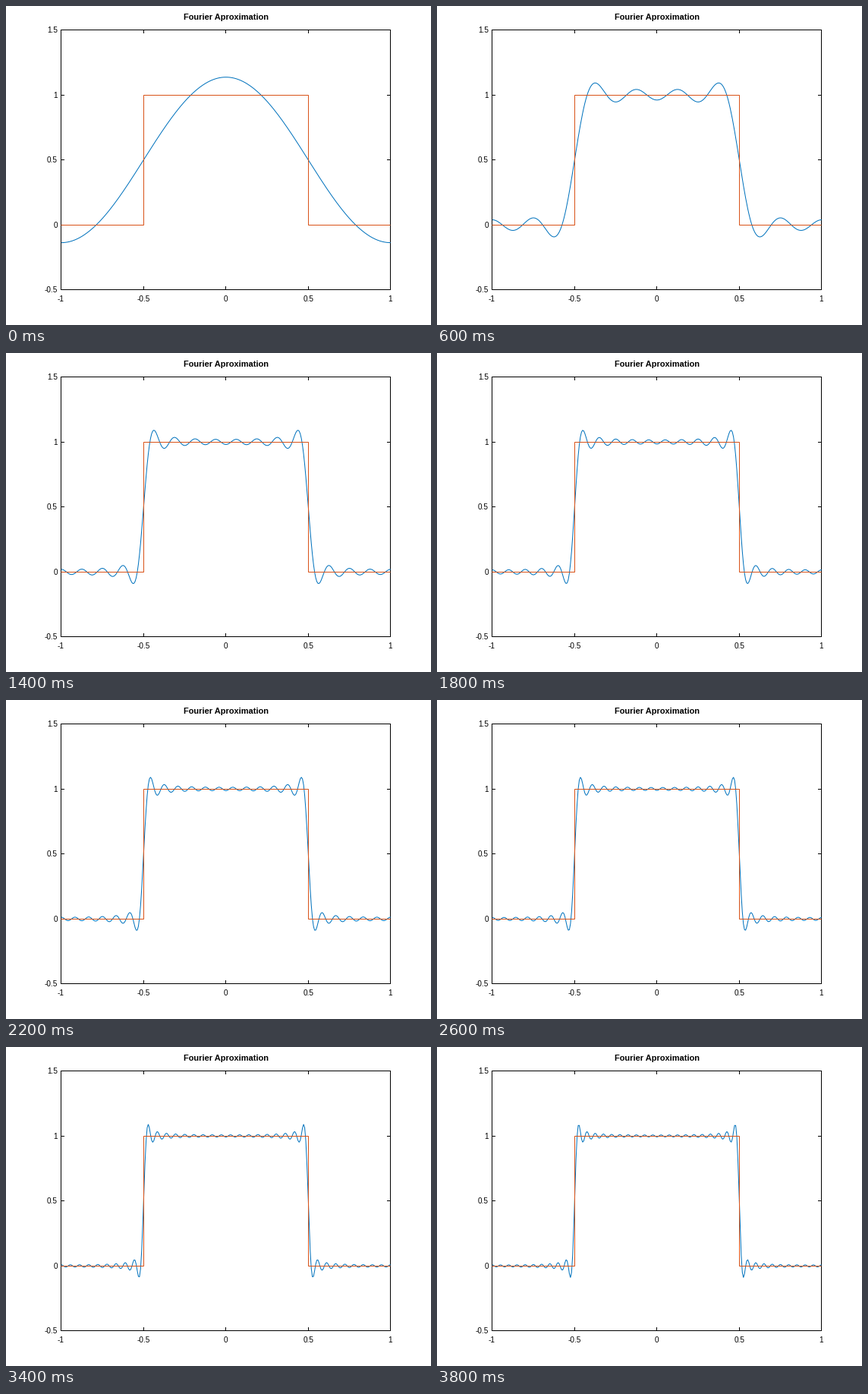
Write a matplotlib script that moves like this. It is 560 px wide and 420 px high and loops after 4000 ms.

```python
import numpy as np
import matplotlib.pyplot as plt
from matplotlib.animation import FuncAnimation
from matplotlib.collections import LineCollection

W, H, DPI = 560, 420, 80
PX = 72 / DPI  # points per pixel
LEFT, RIGHT, TOP, BOTTOM = 72.8, 506.8, 31.5, 373.8
BLUE, ORANGE = "#0072BD", "#D95319"
FRAMES, STEP_MS = 20, 200

plt.rcParams["font.family"] = "Liberation Sans"


def to_x(x):
    return LEFT + (np.asarray(x) + 1) / 2 * (RIGHT - LEFT)


def to_y(y):
    return BOTTOM - (np.asarray(y) + 0.5) / 2 * (BOTTOM - TOP)


def crisp(v):
    """Move a coordinate to the centre of its pixel."""
    return np.floor(v) + 0.5


fig = plt.figure(figsize=(W / DPI, H / DPI), dpi=DPI, facecolor="white")
ax = fig.add_axes([0, 0, 1, 1])
ax.set_xlim(0, W)
ax.set_ylim(H, 0)
ax.axis("off")


def line(xs, ys, color, z):
    return ax.plot(xs, ys, color=color, lw=PX, zorder=z, snap=False,
                   solid_capstyle="butt", solid_joinstyle="miter")[0]


def label(x, y, text, size=10, **kw):
    ax.text(x, y, text, fontsize=size * PX, color="black",
            va="baseline", **kw)


# Frame, ticks and labels
x0, x1, y0, y1 = (crisp(v) for v in (LEFT, RIGHT, TOP, BOTTOM))
line([x0 - 0.5, x1, x1, x0, x0], [y0, y0, y1, y1, y0], "black", 1)

TICK = 4.5
ticks = []
for v in np.linspace(-1, 1, 5):
    x = crisp(to_x(v))
    ticks += [[(x, y1), (x, y1 - TICK)], [(x, y0), (x, y0 + TICK)]]
    label(x, 389, f"{v:g}", ha="center")
for v in np.linspace(-0.5, 1.5, 5):
    y = crisp(to_y(v))
    ticks += [[(x0, y), (x0 + TICK, y)], [(x1, y), (x1 - TICK, y)]]
    label(68, y + 3.5, f"{v:g}", ha="right")
ax.add_collection(LineCollection(ticks, colors="black", linewidths=PX,
                                 zorder=1, snap=False), autolim=False)
label(289.5, 18, "Fourier Aproximation", 11, ha="center", weight="bold")

# Square pulse and its partial sums
t = np.linspace(-1, 1, 300)
curve = line(to_x(t), to_y(t * 0), BLUE, 2)
line(crisp(to_x([-1, -0.5, -0.5, 0.5, 0.5, 1])),
     crisp(to_y([0, 0, 1, 1, 0, 0])), ORANGE, 3)


def partial_sum(terms):
    k = np.arange(terms)[:, None]
    odd = 2 * k + 1
    return 0.5 + 2 / np.pi * ((-1.0) ** k * np.cos(odd * np.pi * t) / odd).sum(0)


def update(i):
    curve.set_ydata(to_y(partial_sum(i + 1)))
    return curve,


anim = FuncAnimation(fig, update, frames=FRAMES, interval=STEP_MS,
                     repeat=True, repeat_delay=0)
plt.show()
```
